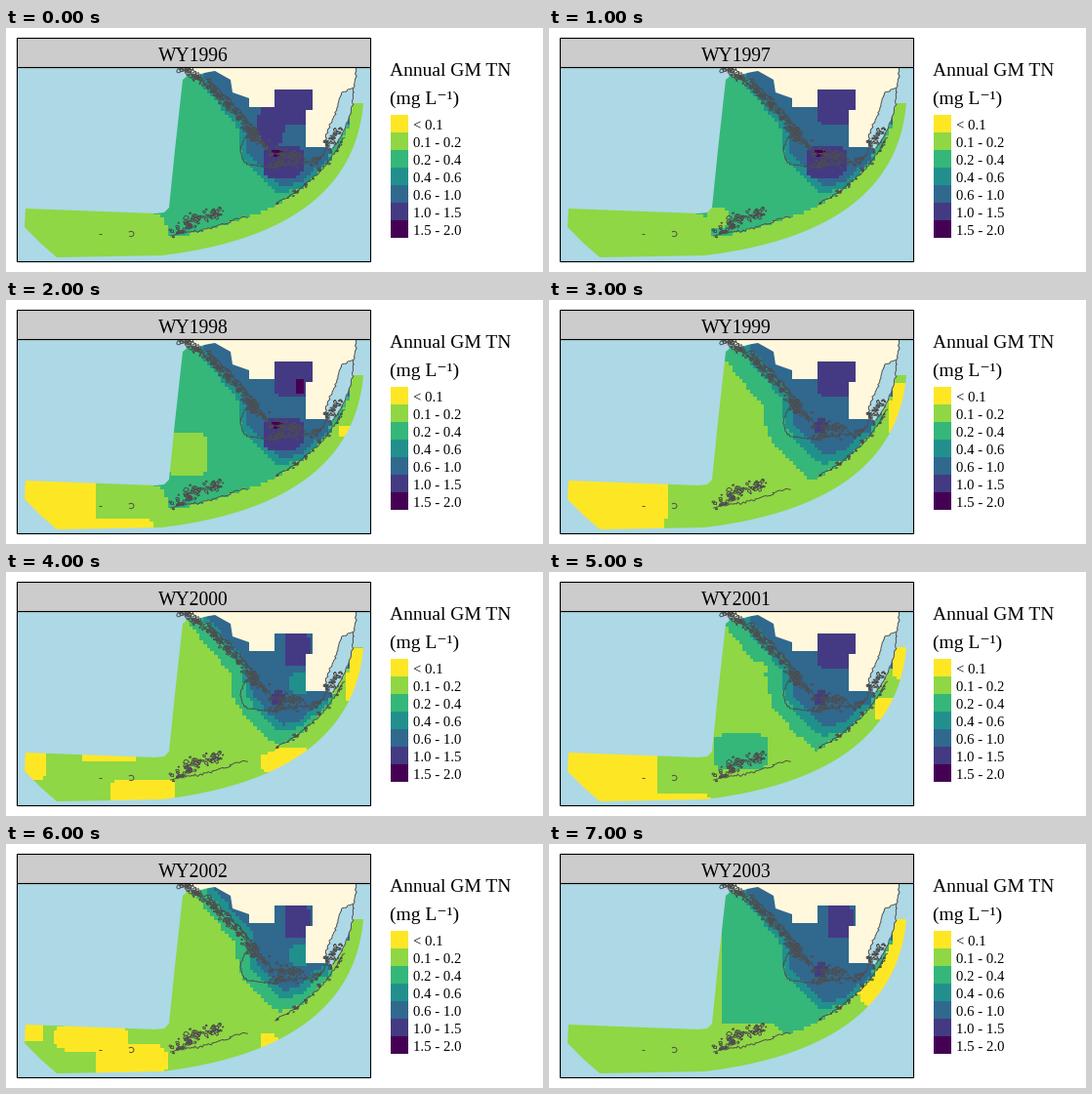
Recreate the animation shown at these times as a matplotlib script. Size 550 by 250 pixels, loop 8 s.

```python
import numpy as np
import matplotlib.pyplot as plt
from matplotlib.animation import FuncAnimation
from matplotlib.collections import LineCollection
from matplotlib.colors import ListedColormap
from matplotlib.patches import Polygon, Rectangle
from matplotlib.path import Path

W, H, DPI = 550, 250, 100
PX = 72 / DPI
CELL = 3.65
SERIF = ["Liberation Serif", "DejaVu Serif"]
COLORS = ["#FDE725", "#8FD744", "#35B779", "#21908C", "#31688E", "#443A83", "#440154"]
LABELS = ["< 0.1", "0.1 - 0.2", "0.2 - 0.4", "0.4 - 0.6", "0.6 - 1.0", "1.0 - 1.5", "1.5 - 2.0"]
WATER, LAND, COAST = "#ADD8E6", "#FFF8DC", "#4D4D4D"
rng = np.random.default_rng(7)


def bezier(a, b, c, n=40):
    t = np.linspace(0, 1, n)[:, None]
    a, b, c = map(np.array, (a, b, c))
    return (1 - t) ** 2 * a + 2 * t * (1 - t) * b + t ** 2 * c


def along(points, step):
    """Evenly spaced points on a polyline."""
    p = np.array(points, float)
    s = np.r_[0, np.cumsum(np.hypot(*np.diff(p, axis=0).T))]
    t = np.linspace(0, s[-1], max(2, int(s[-1] / step)))
    return np.column_stack([np.interp(t, s, p[:, k]) for k in (0, 1)])


def closed(points):
    return Path(np.vstack([points, points[:1]]))


# Geography, in stage pixels
KEYS = bezier((168, 214), (325, 188), (353, 92))
REEF_EDGE = bezier((160, 233), (355, 209), (366, 77))
WEST_COAST = bezier((178, 41), (218, 60), (255, 112))
CAPE = [(255, 112), (245, 113), (239, 128), (246, 140), (273, 142), (300, 137),
        (319, 137), (331, 121)]
BAY = [(358, 41), (357, 61), (343, 67), (337, 90), (329, 105), (327, 122)]
BARRIER = bezier((356, 62), (356, 97), (334, 124))
MARSH = [(199, 45), (219, 70), (242, 96), (247, 128), (264, 147), (280, 162),
         (300, 158), (326, 137)]
DOMAIN = np.vstack([REEF_EDGE, [(356, 77)], BARRIER[20:], [(327, 122), (327, 41),
                    (214, 41), (197, 49), (188, 47), (181, 53), (173, 125),
                    (167, 184), (162, 189), (153, 190), (20, 185), (19, 204),
                    (36, 221), (52, 235), (110, 234)]])
MAINLAND = [(178, 41), (197, 47), (214, 44), (230, 53), (232, 66), (249, 72),
            (249, 81), (275, 81), (275, 63), (314, 63), (314, 84), (307, 84),
            (307, 122), *BAY[::-1]]

# Spots are (class, x, y, half width, half height)
NORTH = (5, 295, 80, 21, 21)
NORTH_SMALL = (5, 298, 80, 14, 17)
CORE = (5, 283, 137, 20, 17)
POND, POND_HIGH = (5, 277, 129, 7, 6), (6, 276, 129, 6, 4)
HOLLOW = (3, 299, 114, 10, 10)
ALL = 300

# Per year: how far classes 2, 3 and 4 reach out from the marsh, then local spots
YEARS = {
    1996: ((ALL, 6.5, 0), [NORTH, CORE, (5, 271, 100, 13, 20), POND_HIGH]),
    1997: ((ALL, 6.5, 0), [NORTH, CORE, POND_HIGH, (1, 172, 195, 10, 12)]),
    1998: ((ALL, 6.5, 0), [NORTH, CORE, POND_HIGH, (6, 300, 87, 5, 7),
                           (1, 185, 158, 21, 22), (0, 20, 205, 71, 50),
                           (0, 115, 235, 36, 13), (0, 349, 134, 8, 7)]),
    1999: ((25, 6, -3), [NORTH, POND, (0, 20, 205, 100, 50), (0, 360, 112, 13, 26)]),
    2000: ((14, 1, -5), [NORTH_SMALL, POND, HOLLOW, (0, 25, 195, 17, 18),
                         (0, 105, 190, 28, 5), (0, 140, 224, 34, 13),
                         (0, 285, 192, 24, 14), (0, 360, 108, 12, 31)]),
    2001: ((21, 6, -3), [NORTH, POND, (1, 218, 98, 4, 6), (2, 196, 184, 28, 19),
                         (0, 20, 205, 91, 50), (0, 130, 236, 35, 10),
                         (0, 362, 91, 12, 18), (0, 344, 140, 12, 11)]),
    2002: ((9, -3, -11), [NORTH_SMALL, HOLLOW, (0, 25, 193, 13, 10),
                          (0, 87, 198, 37, 14), (0, 128, 222, 36, 18),
                          (0, 268, 201, 9, 7)]),
    2003: ((ALL, 6.5, 0), [NORTH_SMALL, POND, (1, 170, 140, 7, 60),
                           (1, 190, 198, 48, 15), (0, 350, 122, 35, 49)]),
}

xs = np.arange(12 + CELL / 2, 374, CELL)
ys = np.arange(41 + CELL / 2, 240, CELL)
gx, gy = np.meshgrid(xs, ys)


def inside(points):
    return closed(points).contains_points(np.c_[gx.ravel(), gy.ravel()]).reshape(gx.shape)


def marsh_distance():
    """Distance to the marsh edge, negative on its inland side."""
    edge = along(MARSH, 1)
    d = np.hypot(gx[..., None] - edge[:, 0], gy[..., None] - edge[:, 1]).min(axis=2)
    return np.where(inside(MARSH + [(353, 92), (353, 30), (199, 30)]), -d, d)


distance = marsh_distance()
behind_keys = inside(np.vstack([KEYS, [(353, 30), (150, 30), (150, 188), (160, 194)]]))


def classify(reach, spots):
    grid = np.ones(gx.shape, int)
    for level, limit in enumerate(reach, 2):
        grid[behind_keys & (distance < limit)] = level
    for level, x, y, rx, ry in spots:
        spot = ((gx - x) / rx) ** 4 + ((gy - y) / ry) ** 4 < 1
        if level == 0:
            spot &= ~behind_keys
        grid[spot] = level
    return grid


def ragged(points, amp=1.0, step=2):
    line = along(points, step)
    return line + rng.normal(0, amp, line.shape)


def islets(points, count, spread, size):
    """Small uneven outlines scattered around a polyline."""
    line = along(points, 1)
    angle = np.linspace(0, 2 * np.pi, 8)
    for _ in range(count):
        centre = line[rng.integers(len(line))] + rng.normal(0, spread, 2)
        r = rng.uniform(0.4, size) * rng.uniform(0.5, 1.3, 8)
        r[-1] = r[0]
        yield centre + np.column_stack([1.3 * r * np.cos(angle), r * np.sin(angle)])


def coastline():
    creeks = [(246, 103), (262, 114), (274, 130), (304, 131)]
    lower_keys = [(170, 211), (193, 197), (222, 188)]
    upper_keys = KEYS[16:36]
    lines = [ragged(path, amp) for path, amp in
             [(WEST_COAST, 0.9), (WEST_COAST + (3, -2), 1.3), (CAPE, 0.8),
              (creeks, 1.4), (BAY, 0.6), (BARRIER, 0.6), (upper_keys, 0.5),
              (KEYS[:12] - (0, 1), 0.8)]]
    for args in [(WEST_COAST, 100, 2.2, 2), (creeks, 50, 4, 2), (CAPE[4:], 35, 2.5, 1.3),
                 (lower_keys, 75, 3.2, 2), (upper_keys, 25, 1, 1.3),
                 (BARRIER[28:] - (5, 4), 28, 2.5, 1.8)]:
        lines += islets(*args)
    turn = np.linspace(-2.4, 2.2, 10)
    lines.append(np.column_stack([128 + 3 * np.cos(turn), 211 + 2.7 * np.sin(turn)]))
    lines.append(np.array([(95, 211), (98, 211)]))
    return lines


fig = plt.figure(figsize=(W / DPI, H / DPI), dpi=DPI, facecolor="white")
ax = fig.add_axes([0, 0, 1, 1])
ax.axis("off")


def label(x, y, text, size, **kw):
    return ax.text(x, y, text, fontsize=size * PX, family=SERIF, color="black",
                   va="baseline", **kw)


panel = Rectangle((11, 40), 362, 199, fc=WATER, ec="none", zorder=0)
ax.add_patch(panel)

grids = [classify(*year) for year in YEARS.values()]
rows, cols = gx.shape
field = ax.imshow(grids[0], cmap=ListedColormap(COLORS), vmin=-0.5, vmax=6.5,
                  extent=(12, 12 + cols * CELL, 41 + rows * CELL, 41),
                  interpolation="nearest", aspect="auto", zorder=1)
field.set_clip_path(closed(DOMAIN), ax.transData)

land = ax.add_patch(Polygon(MAINLAND, fc=LAND, ec="none", zorder=2))
land.set_clip_path(panel)
coast = LineCollection(coastline(), colors=COAST, linewidths=0.95 * PX, zorder=3)
ax.add_collection(coast, autolim=False)
coast.set_clip_path(panel)

for y, h, fill in [(40, 199, "none"), (10, 30, "#CCCCCC")]:
    ax.add_patch(Rectangle((11, y), 362, h, fc=fill, ec="black", lw=1.1 * PX, zorder=4))
title = label(192, 33.5, "", 19.6, ha="center", zorder=5)

label(393, 49, "Annual GM TN", 19.45)
label(393, 78, "(mg L\u207b\u00b9)", 19.45)
for i, (color, text) in enumerate(zip(COLORS, LABELS)):
    top = 89 + 18 * i
    ax.add_patch(Rectangle((394, top), 18, 18, fc=color, ec="none"))
    label(416.6, top + 14.5, text, 14.7)

ax.set_xlim(0, W)
ax.set_ylim(H, 0)
names = [f"WY{year}" for year in YEARS]


def draw(i):
    field.set_data(grids[i])
    title.set_text(names[i])
    return field, title


anim = FuncAnimation(fig, draw, frames=len(names), interval=1000, repeat=True,
                     repeat_delay=0, blit=False)
plt.show()
```
